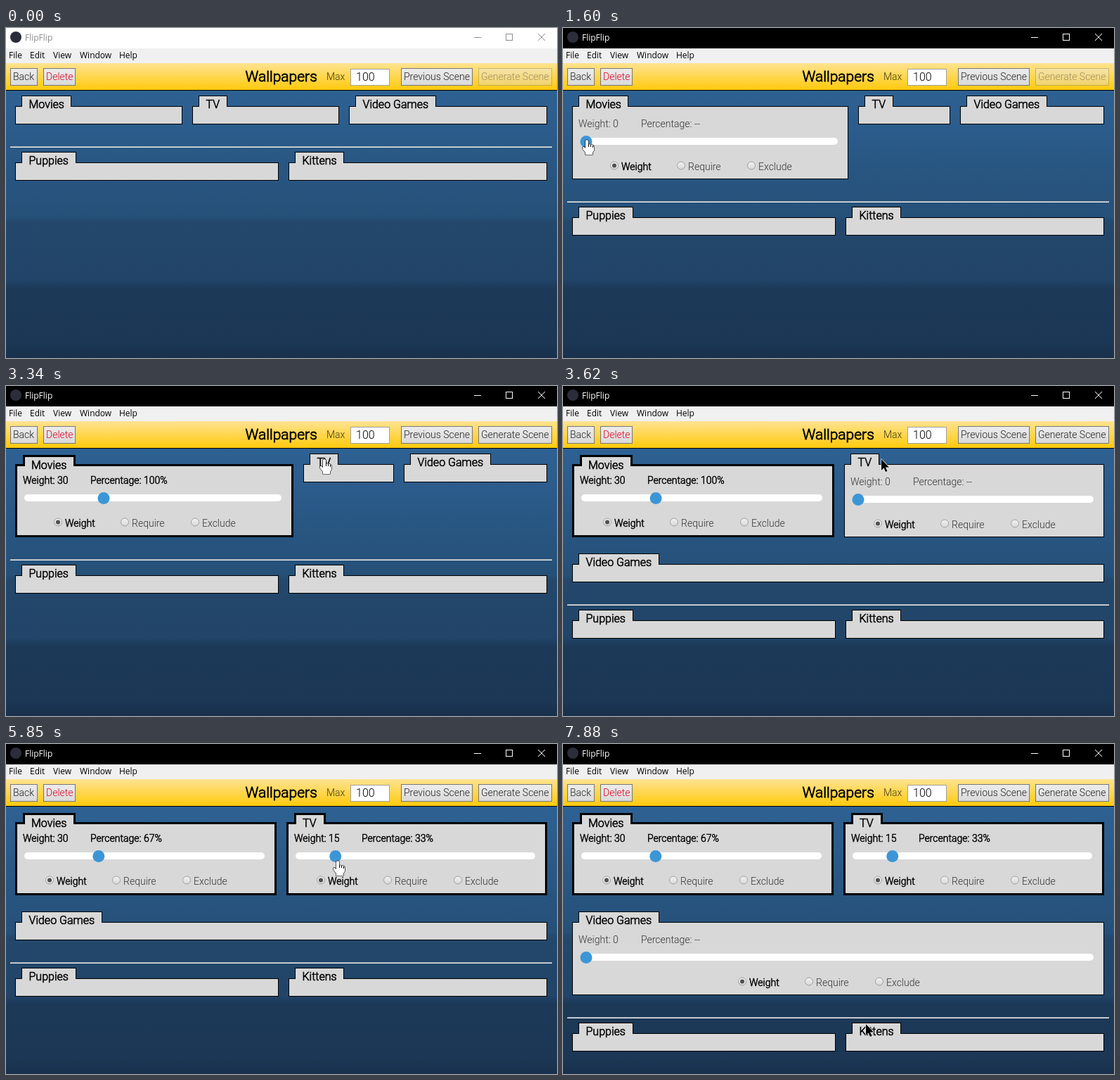
An HTML page with a canvas that plays this animation: 784x469 px, repeating every 8000 ms.

```html
<!DOCTYPE html>
<html lang="en">
<head>
<meta charset="utf-8">
<title>FlipFlip</title>
<style>
html, body { margin: 0; width: 100%; height: 100%; overflow: hidden; }
canvas { display: block; }
</style>
</head>
<body>
<canvas id="stage" width="784" height="469"></canvas>
<script>
const c = document.getElementById('stage').getContext('2d');
const LOOP = 8000, STEP = 135;
const LEFT = 13, RIGHT = 770, GAP = 14;
const GREY = '#d8d8d8';
const UI = '12px "Open Sans", "Noto Sans", sans-serif';
const BASE = { Movies: 70.5, TV: 40.8, 'Video Games': 114.5, Puppies: 77.5, Kittens: 70 };

// Pointer moves: start, end, x, y, bend of the path
const MOVES = [
  [430, 940, 62, 106], [1068, 1450, 34, 159], [1600, 2150, 139, 160],
  [2680, 3340, 453, 104, 70], [3620, 4010, 420, 158], [4290, 4590, 466, 159],
  [4740, 4740, 458, 157], [5150, 5150, 459, 157], [5420, 5850, 472, 166],
  [5970, 6390, 470, 165], [6820, 7610, 86, 242], [7760, 7760, 90, 283],
  [7880, 7880, 431, 398]
];

// The screen refreshes about every STEP ms while the pointer moves, so progress is in whole steps.
function pointerAt(t) {
  let p = { x: 180, y: 190, u: 0 };
  for (const [start, end, x, y, bend = 0] of MOVES) {
    if (t < start) break;
    const n = Math.round((end - start) / STEP);
    const u = n ? Math.min(n, Math.floor((t - start) / (end - start) * n + .01)) / n : 1;
    p = { x: p.x + (x - p.x) * u, y: p.y + (y - p.y) * u + bend * Math.sin(Math.PI * u), u };
  }
  return p;
}

// Slider value set by dragging between two times
function drag(t, from, to, zero, unit, max) {
  if (t < from) return 0;
  const value = Math.round((pointerAt(Math.min(t, to)).x - zero) / unit);
  return Math.max(0, Math.min(max, value));
}

function rect(x, y, w, h, fill) {
  c.fillStyle = fill;
  c.fillRect(x, y, w, h);
}

function frame(x, y, w, h, line, fill, b = 1) {
  rect(x + b, y + b, w - 2 * b, h - 2 * b, fill);
  c.strokeStyle = line;
  c.lineWidth = b;
  c.strokeRect(x + b / 2, y + b / 2, w - b, h - b);
}

function grad(...stops) {
  const y0 = stops[0][0], y1 = stops[stops.length - 1][0];
  const g = c.createLinearGradient(0, y0, 0, y1);
  for (const [y, color] of stops) g.addColorStop((y - y0) / (y1 - y0), color);
  return g;
}

function circle(x, y, r, fill, line) {
  c.beginPath();
  c.arc(x, y, r, 0, 7);
  c.fillStyle = fill;
  c.fill();
  if (line) { c.strokeStyle = line; c.lineWidth = 1; c.stroke(); }
}

function label(s, x, y, color, font) {
  c.font = font;
  c.fillStyle = color;
  c.fillText(s, x, y);
}

function text(s, x, y, size = 14, color = '#222', bold = false) {
  label(s, x, y, color, `300 ${size}px Roboto, sans-serif`);
  if (bold) {
    c.strokeStyle = color;
    c.lineWidth = size / 26;
    c.strokeText(s, x, y);
  }
}

function lines(color, ...paths) {
  c.strokeStyle = color;
  c.lineWidth = 1;
  c.beginPath();
  for (const [x0, y0, x1, y1] of paths) { c.moveTo(x0, y0); c.lineTo(x1, y1); }
  c.stroke();
}

function button(name, x, w, color) {
  frame(x, 57, w, 25, '#777', grad([57, '#ededed'], [82, '#d9d9d9']));
  text(name, x + 4, 74, 14, color);
}

function chrome(active, ready) {
  const ink = active ? '#fff' : '#8c8c8c';
  rect(0, 0, 784, 29, active ? '#000' : '#fff');
  circle(14, 13, 8, '#2b2e3a');
  label('FlipFlip', 27, 18, ink, UI);
  lines(ink, [666, 13.5, 676, 13.5], [757, 8, 767, 18], [767, 8, 757, 18]);
  c.strokeRect(711.5, 8.5, 9, 9);

  rect(0, 29, 784, 21, '#f0f0f0');
  [['File', 4], ['Edit', 34], ['View', 67], ['Window', 105], ['Help', 161]]
    .forEach(([s, x]) => label(s, x, 43, '#000', UI));

  rect(0, 50, 784, 38, grad([50, '#ffe391'], [88, '#ffca0c']));
  rect(0, 88, 784, 1, '#000');
  button('Back', 6, 39);
  button('Delete', 53, 46, '#e00020');
  text('Wallpapers', 340.5, 76, 21, '#000', true);
  text('Max', 456, 74, 14, '#443a10');
  frame(490, 58, 56, 24, '#a0a0a0', '#fff');
  text('100', 498, 75, 16, '#000');
  button('Previous Scene', 562, 102);
  c.globalAlpha = ready ? 1 : .4;
  button('Generate Scene', 672, 105);
  c.globalAlpha = 1;
}

function controls(x, y, right, weight, share) {
  const on = weight > 0, ink = on ? '#000' : '#333';
  const left = x + (on ? 13 : 12), end = right - (on ? 17 : 15);
  const mid = y + (on ? 48 : 50), base = mid - 20;
  text('Weight: ' + weight, x + (on ? 11 : 9), base, 14, ink, on);
  text('Percentage: ' + (on ? share + '%' : '--'), x + (on ? 107 : 98), base, 14, ink, on);
  c.fillStyle = '#fff';
  c.beginPath();
  c.roundRect(left, mid - 5, end - left, 10, 5);
  c.fill();
  circle(left + 8 + (end - left - 16) * weight / 100, mid + .5, 8.5, '#3c96d6');

  const rx = Math.floor((x + right) / 2 - 136.5), ry = mid + 34.5;
  ['Weight', 'Require', 'Exclude'].forEach((s, i) => {
    const px = rx + [0, 95, 195][i];
    circle(px, ry, 5.5, grad([ry - 6, '#f4f4f4'], [ry + 6, '#d6d6d6']), '#a0a0a0');
    if (!i) circle(px, ry, 3, '#505050');
    text(s, px + 10, ry + 6.5, 14, i ? '#333' : '#000', !i);
  });
}

function panel(x, right, y, { name, open, weight, share }) {
  const on = weight > 0, b = on ? 3 : 1;
  const tx = x + (on ? 11 : 9), ty = y - (on ? 13 : 15);
  const tw = Math.ceil(BASE[name]) + (on ? 4 : 0);
  frame(x, y, right - x, open ? 104 : 26, '#000', GREY, b);
  rect(tx, ty, tw, y - ty + b, '#000');
  rect(tx + b, ty + b, tw - 2 * b, y - ty, GREY);
  text(name, x + (on ? 23 : 19.5), y + (on ? 7 : 3), 16, '#000', true);
  if (open) controls(x, y, right, weight, share);
}

const item = (name, open = false, weight = 0, share = 0) => ({
  name, open, weight, share,
  base: open ? (weight ? 306.5 : 303) : BASE[name]
});

// Lays panels out in wrapping rows that share the spare width evenly; returns the bottom edge.
function flow(items, y) {
  const rows = [[]];
  const width = row => row.reduce((sum, i) => sum + i.base + GAP, -GAP);
  for (const i of items) {
    const row = rows[rows.length - 1];
    if (width([...row, i]) > 750 && row.length) rows.push([i]);
    else row.push(i);
  }
  for (const row of rows) {
    const spare = (RIGHT - LEFT - width(row)) / row.length;
    let x = LEFT;
    for (const i of row) {
      const right = x + i.base + spare;
      panel(Math.round(x), Math.round(right), y, i);
      x = right + GAP;
    }
    y += (row.some(i => i.open) ? 104 : 26) + 38;
  }
  return y - 38;
}

function shape(points, fill, line) {
  c.beginPath();
  points.forEach(([x, y]) => c.lineTo(x, y));
  c.closePath();
  c.fillStyle = fill;
  c.strokeStyle = line;
  c.lineWidth = 1.2;
  c.lineJoin = 'round';
  c.stroke();
  c.fill();
}

function pointer({ x, y, u }) {
  const onSlider = y > 155 && y < 170;
  c.save();
  c.translate(Math.round(x), Math.round(y));
  if (y < 260 && (u === 1 || onSlider)) {
    shape([[-2, 1], [0, 0], [2, 1], [2, 6], [8, 7], [10, 9], [10, 15], [8, 18], [8, 21],
      [-2, 21], [-2, 18], [-6, 13], [-6, 10], [-4, 10], [-2, 12]], '#fff', '#000');
    lines('#000', [2.5, 6, 2.5, 10], [5.5, 7, 5.5, 10], [8.5, 8, 8.5, 11]);
  } else {
    shape([[0, 0], [0, 16], [3.5, 12.5], [6, 18], [8.5, 17], [6, 11.5], [11, 11.5]], '#000', '#fff');
  }
  c.restore();
}

function draw(t) {
  const movies = drag(t, 1600, 2150, 34, 3.5, 30);
  const tv = drag(t, 4290, 5850, 419, 3.26, 15);
  const share = movies ? Math.round(100 * movies / (movies + tv)) : 0;
  const opened = t >= 1068;

  rect(0, 0, 784, 469, grad([89, '#2e6193'], [268, '#255078'], [276, '#23486c'],
    [358, '#214468'], [370, '#1c3958'], [448, '#1b3755'], [469, '#18304b']));
  chrome(opened, movies > 0);

  const bottom = flow([
    item('Movies', opened, movies, share),
    item('TV', t >= 3620, tv, 100 - share),
    item('Video Games', t >= 7760)
  ], 111);
  rect(6, bottom + 31, 771, 1, '#9aa4ae');
  rect(6, bottom + 32, 771, 1, '#eee');
  flow([item('Puppies'), item('Kittens')], bottom + 54);

  if (t >= MOVES[0][0]) pointer(pointerAt(t));
}

function tick() {
  draw(performance.now() % LOOP);
  requestAnimationFrame(tick);
}
tick();
</script>
</body>
</html>
```
